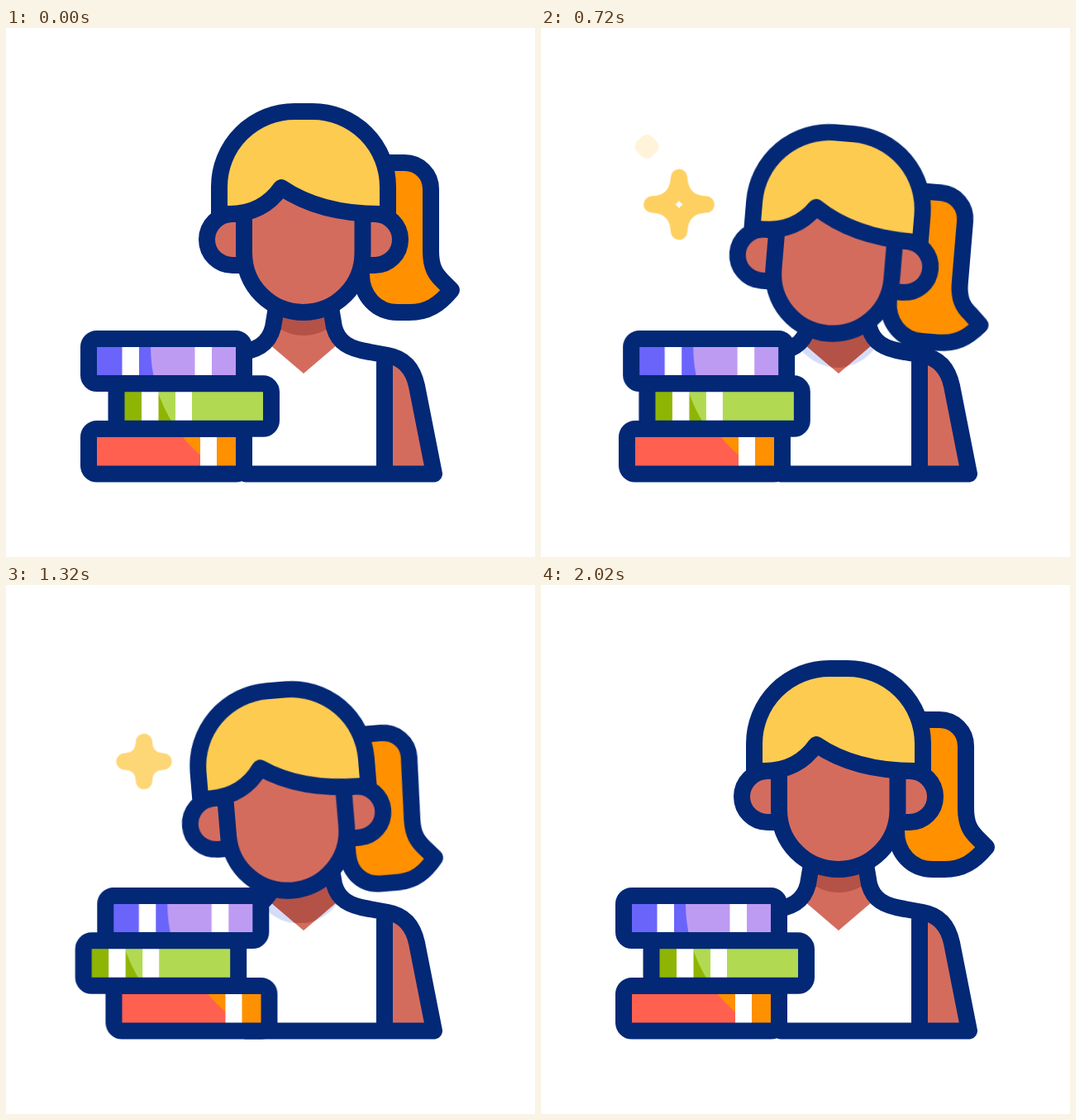
An HTML page that plays this animation: 640 by 640 pixels, repeating every 2420 ms.

```html
<!DOCTYPE html>
<html lang="en">
<head>
<meta charset="utf-8">
<title>Student with books</title>
<style>
html, body { margin: 0; width: 100%; height: 100%; overflow: hidden; background: #fff; }
svg { display: block; width: 100%; height: 100%; }

.line { stroke: #032876; stroke-width: 20; stroke-linecap: round; stroke-linejoin: round; }
.none { fill: none; }
.skin { fill: #d46c5e; }
.hair { fill: #fdcb50; }
.star { fill: none; stroke: #fdcb50; stroke-width: 20; stroke-linejoin: round; vector-effect: non-scaling-stroke; }

/* Key times: 400 ms = 16.529%, 600 = 24.793%, 1000 = 41.322%, 1200 = 49.587%, 1600 = 66.116%, 2000 = 82.645% */
.move { animation: 2420ms cubic-bezier(.333, 0, .667, 1) infinite both; }
.head { animation-name: head; transform-origin: 360px 346px; }
.tail { animation-name: tail; }
.shade { animation-name: shade; }
.top { animation-name: top; }
.mid, .low { animation-name: slide; }
.mid { --shift: -51px; }
.low { --shift: 39px; }
.grow1 { animation-name: grow1; }
.grow2 { animation-name: grow2; }
.fade1 { animation-name: fade1; }
.fade2 { animation-name: fade2; }

@keyframes head {
  0%, 82.645%, 100% { transform: translate(0px, 0px) rotate(0deg); }
  16.529%, 24.793%, 66.116% { transform: translate(-13px, 25.5px) rotate(8.5deg); }
  41.322%, 49.587% { transform: translate(-13px, 25.5px) rotate(-8.5deg); }
}
@keyframes tail {
  0%, 49.587%, 82.645%, 100% {
    d: path("M455 163 L482 163 C500 163 514 177 514 195 L514 270 C514 290 520 298 528 306 L539 317 C524 335 510 344 488 344 L474 344 C448 344 430 324 430 298 L430 250 Z");
  }
  16.529%, 66.116% {
    d: path("M455 163 L482 163 C500 163 515 177 513 195 L501 272 C498 286 501 296 507 306 L520 326 C514 335 504 346 492 347 L440 347 C434 347 431 343 431 334 L430 250 Z");
  }
  16.529% { animation-timing-function: cubic-bezier(.4, 0, .8, .7); }
  27.273% {
    d: path("M455 163 L482 163 C500 163 514 177 514 195 L514 270 C514 290 520 298 528 306 L539 317 C524 335 510 344 488 344 L474 344 C448 344 430 324 430 298 L430 250 Z");
    animation-timing-function: cubic-bezier(.2, .3, .6, 1);
  }
  41.322% {
    d: path("M455 163 L482 163 C500 163 514 177 514 195 L514 270 C514 286 520 299 534 306 L553 323 C538 340 526 344 508 344 L474 344 C448 344 430 324 430 298 L430 250 Z");
  }
}
@keyframes shade {
  0%, 82.645%, 100% { transform: translate(0px, 0px); }
  16.529%, 24.793%, 66.116% { transform: translate(0px, 39px); }
  41.322%, 49.587% { transform: translate(-7px, 37px); }
}
@keyframes top {
  0%, 66.116%, 100% { transform: translateX(0px); }
  16.529% { transform: translateX(-25px); }
  33.058% { transform: translateX(13px); }
  49.587% { transform: translateX(26px); }
}
@keyframes slide {
  0%, 33.058%, 66.116%, 100% { transform: translateX(0px); }
  16.529%, 49.587% { transform: translateX(var(--shift)); }
}
@keyframes grow1 {
  0%, 26.86%, 53.72%, 100% { transform: scale(.01); }
  43.388% { transform: scale(1); }
}
@keyframes grow2 {
  0%, 16.529%, 65.083%, 100% { transform: scale(.01); }
  34.711%, 46.281% { transform: scale(.85); }
}
@keyframes fade1 {
  0%, 24.793%, 53.306%, 100% { opacity: 0; }
  41.322%, 44.628% { opacity: 1; }
}
@keyframes fade2 {
  0%, 16.529%, 66.116%, 100% { opacity: 0; }
  33.058%, 49.587% { opacity: 1; }
}
</style>
</head>
<body>
<svg viewBox="0 0 640 640">
  <defs>
    <path id="torso" d="M327 338 L323 362 C318 382 304 392 272 394 V539.5 H458 V395 L440 392 C414 388 402 380 397 362 L393 338 Z"/>
    <path id="neck" d="M327 338 L323 362 Q320 372 312 377 L360 418 L408 377 Q400 372 397 362 L393 338 Z"/>
    <path id="spark" class="star" d="M0 -47 Q2.5 -2.5 47 0 Q2.5 2.5 0 47 Q-2.5 2.5 -47 0 Q-2.5 -2.5 0 -47 Z"/>
    <clipPath id="inTorso"><use href="#torso"/></clipPath>
    <clipPath id="inNeck"><use href="#neck"/></clipPath>
  </defs>

  <!-- body -->
  <g>
    <g clip-path="url(#inTorso)"><circle class="move shade" cx="360" cy="316" r="56" fill="#d4dcf8"/></g>
    <use href="#neck" class="skin"/>
    <g clip-path="url(#inNeck)"><circle class="move shade" cx="360" cy="316" r="56" fill="#b45247"/></g>
    <path class="skin" d="M458 395 Q491 399 497 433 L518 539.5 H458 Z"/>
    <path class="line none" d="M327 338 L323 362 C318 382 304 392 272 394 M393 338 L397 362 C402 380 414 388 440 392 L462 396 Q490 401 497 433 L518 539.5 H290 M458 398 V539.5"/>
  </g>

  <!-- head -->
  <g class="move head">
    <path class="line move tail" fill="#ff9000" d="M455 163 L482 163 C500 163 514 177 514 195 L514 270 C514 290 520 298 528 306 L539 317 C524 335 510 344 488 344 L474 344 C448 344 430 324 430 298 L430 250 Z"/>
    <path class="line skin" d="M288 225 H274 A31 31 0 0 0 274 287 H288"/>
    <path class="line skin" d="M432 225 H446 A31 31 0 0 1 446 287 H432"/>
    <path class="line skin" d="M288 225 V272 A71.75 72 0 0 0 431.5 272 V225 L333 193 Z"/>
    <path class="line hair" d="M258 225 V192 A91 91 0 0 1 349 101 H371 A91 91 0 0 1 462 192 V225 H452 Q380 225 333 193 Q310 226 268 225 Z"/>
  </g>

  <!-- books -->
  <g class="move low">
    <rect x="100" y="485" width="188" height="54.5" rx="10" fill="#ff6050"/>
    <path fill="#ff9000" d="M206.3 485 A172 172 0 0 0 269.4 539.5 H284 V485 Z"/>
    <path fill="#fff" d="M235 485 h20 v54 h-20 Z"/>
    <rect class="line none" x="100" y="485" width="188" height="54.5" rx="10"/>
  </g>
  <g class="move mid">
    <rect x="133.5" y="430.3" width="187.5" height="54.5" rx="10" fill="#8fb504"/>
    <path fill="#b1da52" d="M180.7 430 A172 172 0 0 0 206.3 485 H316 V430 Z"/>
    <path fill="#fff" d="M164 431 h20.5 v54 h-20.5 Z M205 431 h20 v54 h-20 Z"/>
    <rect class="line none" x="133.5" y="430.3" width="187.5" height="54.5" rx="10"/>
  </g>
  <g class="move top">
    <rect x="100" y="376" width="188" height="54" rx="10" fill="#6a64fb"/>
    <path fill="#be9bf3" d="M175 376 V386 A172 172 0 0 0 180.7 430 H284 V376 Z"/>
    <path fill="#fff" d="M140.5 376 h20.5 v54 h-20.5 Z M228.5 376 h20.5 v54 h-20.5 Z"/>
    <rect class="line none" x="100" y="376" width="188" height="54" rx="10"/>
  </g>

  <!-- sparkles -->
  <g transform="translate(128 143.5)">
    <g class="move fade1"><g class="move grow1"><use href="#spark"/></g></g>
  </g>
  <g transform="translate(167 213.5)">
    <g class="move fade2"><g class="move grow2"><use href="#spark"/></g></g>
  </g>
</svg>
</body>
</html>
```
